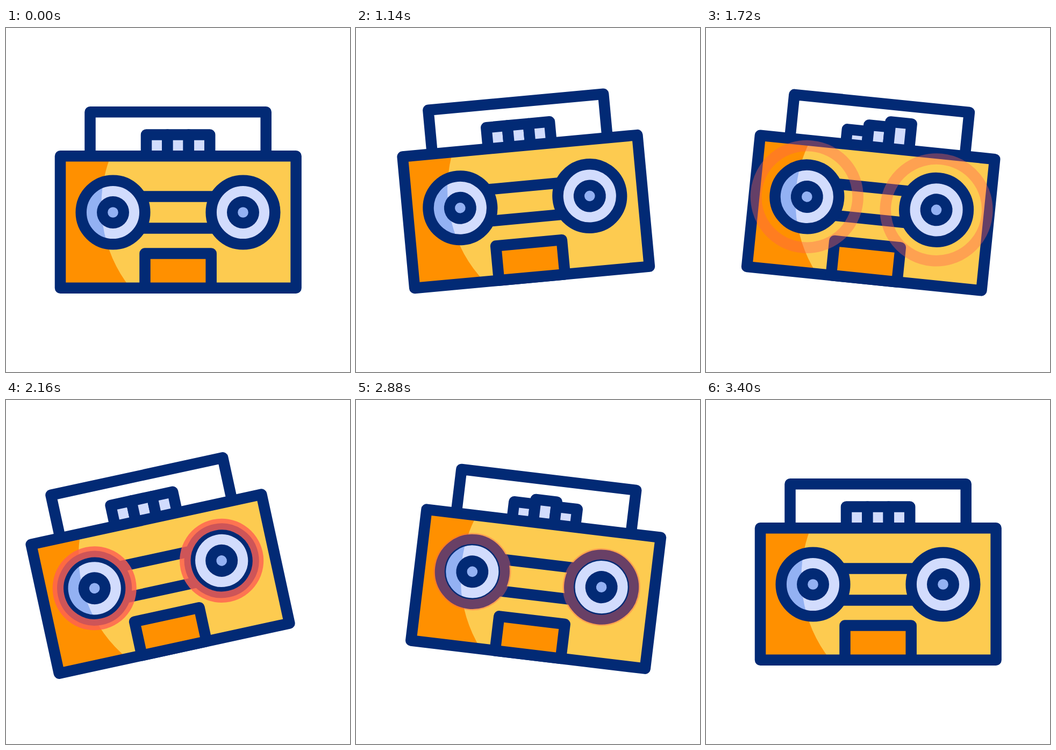
These frames come from a looping animation (640 by 640 pixels, 3600 ms). An HTML page:

```html
<!DOCTYPE html>
<html lang="en">
<head>
<meta charset="utf-8">
<title>Boombox</title>
<style>
  html, body { margin: 0; width: 100%; height: 100%; overflow: hidden; background: #fff; }
  svg { display: block; width: 100%; height: 100%; }
  .line { stroke: #022a75; stroke-width: 20.5; stroke-linejoin: round; }
  .navy { fill: #022a75; }
  .yellow { fill: #fdcb50; }
  .orange { fill: #ff9000; }
  .pale { fill: #d2dcfd; }
  .blue { fill: #93b1f3; }
  .hollow { fill: none; }
  .ring { fill: none; stroke: #ff6052; stroke-width: 20.5; }
</style>
</head>
<body>
<svg viewBox="0 0 640 640">
  <defs>
    <clipPath id="coneClip"><circle cx="199" cy="343" r="55"/></clipPath>
    <!-- everything left of a large circle lies in shade -->
    <path id="shade" d="M101 238H194.8A248 248 0 0 0 231.7 484H101Z"/>
  </defs>
  <g id="box">
    <path class="line hollow" d="M156.5 238V156.3H483.7V238"/>
    <g id="keys" class="line pale"></g>
    <rect class="yellow" x="101" y="238" width="438.6" height="245.8"/>
    <use href="#shade" class="orange"/>
    <rect class="line hollow" x="101" y="238.2" width="438.6" height="245.6"/>
    <path class="line" d="M199 313.6H441M199 372.5H441"/>
    <rect class="line orange" x="258.5" y="419.5" width="123.2" height="64.3"/>
    <circle class="pale" cx="199" cy="343" r="59"/>
    <use href="#shade" class="blue" clip-path="url(#coneClip)"/>
    <circle class="pale" cx="441" cy="343" r="59"/>
    <g id="speakers"></g>
  </g>
</svg>
<script>
const LOOP = 3600, BEGIN = 400, END = 3400;
const SPEAKERS = [199, 441];
const KEY = { x: 261, y: 198.5, w: 39.4 };

// turning points of the dance: [time, value], eased in and out
const TILT = [[BEGIN, 0], [940, -10.2], [1565, 10], [2130, -12.5], [2670, 12.5], [3120, 0]];
const SWAY = [[BEGIN, 0], [940, -26], [1366, 22], [2040, -44], [2566, 36], [3120, 0]];

const BOUNCE = { first: 408, length: 277, base: 6, height: 15 };
const PULSE = { first: 480, gap: 780, count: 4, life: 520, grow: 380, fade: 150, from: 59.3, by: 35.5 };

// the three keys rise and sink together in a few bursts
const BURST_SPAN = 400;
const BURSTS = [
  { time: 660, lifts: [6, -5, 6] },
  { time: 1720, lifts: [-12, 0, 10] },
  { time: 2880, lifts: [-6, 3, -6] }
];

const clamp = v => Math.max(0, Math.min(1, v));
const smooth = u => u * u * (3 - 2 * u);
const ramp = (t, from, to) => smooth(clamp((t - from) / (to - from)));

function along(points, t) {
  return points.slice(1).reduce((v, [time, value], i) => {
    const [before, last] = points[i];
    return v + (value - last) * ramp(t, before, time);
  }, points[0][1]);
}

function bounce(t) {
  const { first, length, base, height } = BOUNCE;
  const strength = ramp(t, BEGIN, BEGIN + 100) * (1 - ramp(t, END - 400, END));
  return -strength * (base + height * Math.abs(Math.sin(Math.PI * (t - first) / length)));
}

function lift(i, t) {
  return BURSTS.reduce((sum, b) =>
    sum + b.lifts[i] * smooth(clamp(1 - Math.abs(t - b.time) / BURST_SPAN)), 0);
}

function pulse(t) {
  const n = Math.floor((t - PULSE.first) / PULSE.gap);
  const age = t - PULSE.first - n * PULSE.gap;
  const live = n >= 0 && n < PULSE.count;
  return {
    r: PULSE.from + PULSE.by * ramp(age, 0, PULSE.grow),
    alpha: live ? clamp(Math.min(age, PULSE.life - age) / PULSE.fade) : 0
  };
}

const circle = (cls, cx, r) => `<circle class="${cls}" cx="${cx}" cy="343" r="${r}"/>`;

document.getElementById('speakers').innerHTML =
  SPEAKERS.map(x => circle('line hollow', x, 59.3) + circle('navy', x, 30) + circle('blue', x, 9.8)).join('') +
  SPEAKERS.map(x => circle('ring', x, PULSE.from)).join('');

document.getElementById('keys').innerHTML = [0, 1, 2].map(i =>
  `<rect class="key" x="${KEY.x + i * KEY.w}" y="${KEY.y}" width="${KEY.w}" height="70"/>`).join('');

const box = document.getElementById('box');
const keys = document.querySelectorAll('.key');
const rings = document.querySelectorAll('.ring');

function draw(t) {
  box.setAttribute('transform',
    `translate(${along(SWAY, t)} ${bounce(t)}) rotate(${along(TILT, t)} 320.2 361)`);
  keys.forEach((key, i) => key.setAttribute('y', KEY.y - lift(i, t)));
  const { r, alpha } = pulse(t);
  rings.forEach(ring => {
    ring.setAttribute('r', r);
    ring.setAttribute('opacity', alpha);
  });
}

const start = performance.now();
function tick() {
  draw((performance.now() - start) % LOOP);
  requestAnimationFrame(tick);
}
draw(0);
requestAnimationFrame(tick);
</script>
</body>
</html>
```
